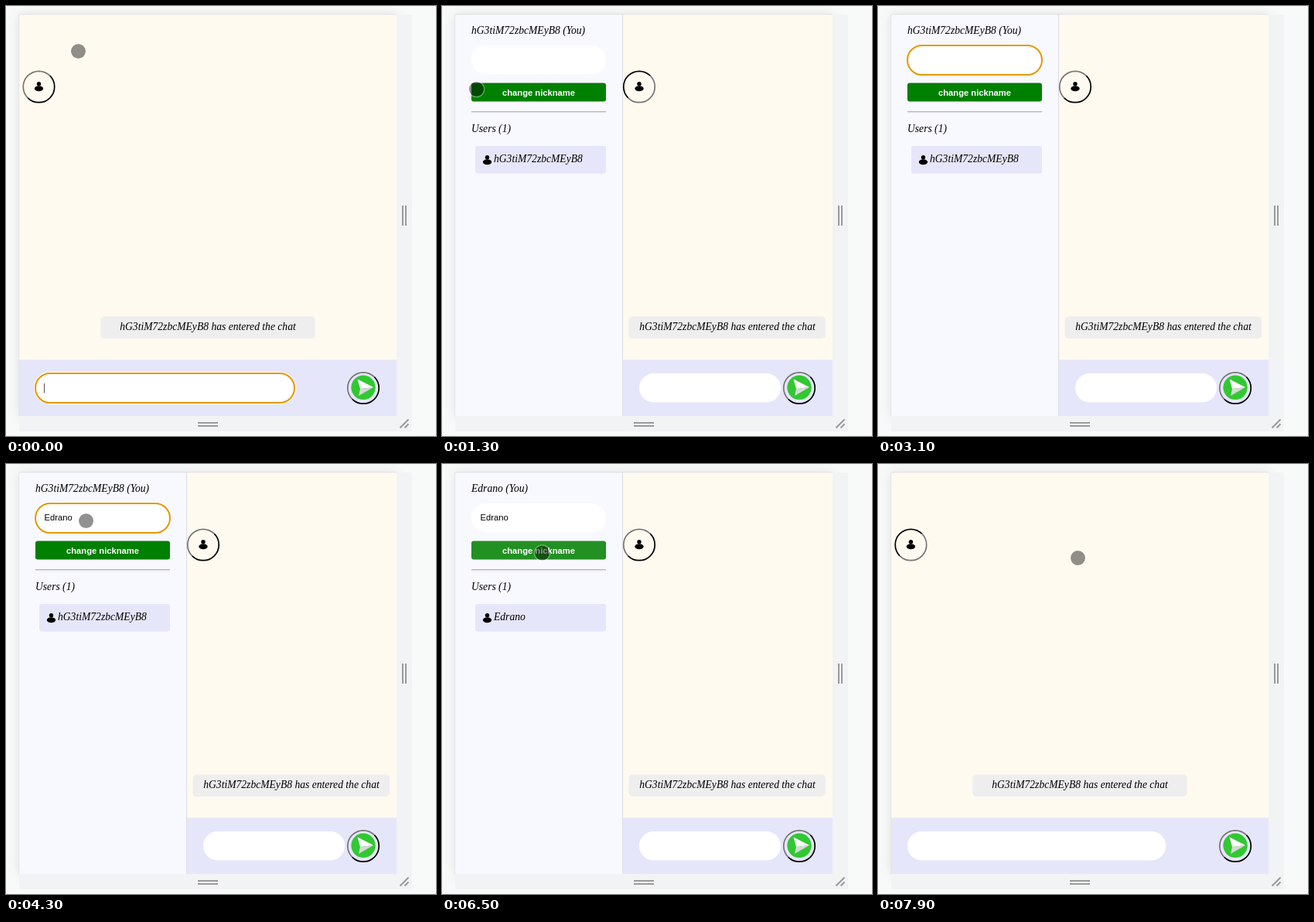
An HTML page that plays this animation: 556 px wide and 556 px high, repeating every 8000 ms.

```html
<!DOCTYPE html>
<html lang="en">
<head>
<meta charset="utf-8">
<title>Chat sidebar</title>
<style>
  html, body { margin: 0; width: 100%; height: 100%; overflow: hidden; background: #f8faf9; }
  svg { display: block; width: 556px; height: 556px; }
  .serif { font: italic 13.6px "Liberation Serif", "Times New Roman", serif; }
  .sans { font: 11.2px "Liberation Sans", Arial, sans-serif; }
  .bold { font-weight: bold; fill: #fff; }
  .mid { text-anchor: middle; }
  .ring { fill: none; stroke: #e59700; stroke-width: 2; }
  .halo { fill: none; stroke: #fff; stroke-width: 4; }
  .edge { fill: none; stroke-width: 1.7; }
  .caret { fill: #555; }
  .grip { stroke: #9a9a9a; stroke-width: 2; }
  #page { filter: drop-shadow(0 0 8px rgba(0, 0, 0, .1)); }
</style>
</head>
<body>
<svg viewBox="0 0 556 556">
  <defs>
    <g id="person">
      <circle cy="-3.8" r="2.7"/>
      <ellipse cy="2.3" rx="5.7" ry="3.5"/>
    </g>
    <path id="half" d="M-14.3 14.3A20.2 20.2 0 0 1 14.3-14.3"/>
  </defs>
  <rect width="556" height="556" fill="#f8faf9"/>
  <rect id="page" x="17" y="11" width="488" height="519" fill="#fffaf0"/>
  <path d="M505 11h20v539H17v-20h488z" fill="#f1f3f4"/>
  <path class="grip" d="M513 258v26M517 258v26M248 539h26M248 543h26M509.5 545.5l11-11M515.5 545.5l5-5"/>

  <rect id="foot" y="457.5" height="72.5" fill="#e6e6fa"/>
  <rect id="note" y="401.5" height="28.5" rx="5" fill="#eee"/>
  <text id="noteText" class="serif mid" y="419"></text>

  <rect id="field" y="475" height="37.5" rx="18.7" fill="#fff"/>
  <g id="focusMain">
    <rect class="halo" x="38" y="475" width="335" height="38" rx="19"/>
    <rect class="ring" x="38" y="475" width="335" height="38" rx="19"/>
  </g>
  <rect id="caretMain" class="caret" x="49" y="488" width="1" height="12.5"/>

  <g transform="translate(462 494)">
    <use class="edge" href="#half" stroke="#767676"/>
    <use class="edge" href="#half" stroke="#000" transform="rotate(180)"/>
    <circle cy="-.7" r="15.7" fill="#32c832"/>
    <path fill="#fff" d="M-7.5-11.5L13-1L-4 1Z"/>
    <path fill="#d8d8d8" d="M-4 1L13-1L-6 10Z"/>
  </g>

  <g id="side">
    <rect x="17" y="11" width="216" height="519" fill="#f8f8ff"/>
    <path d="M233.5 11v519" stroke="#dcdce0"/>
    <text id="me" class="serif" x="38" y="36"></text>
    <rect x="38" y="51" width="174" height="37.5" rx="18.7" fill="#fff"/>
    <g id="focusName">
      <rect class="halo" x="38" y="51" width="174" height="38" rx="19"/>
      <rect class="ring" x="38" y="51" width="174" height="38" rx="19"/>
    </g>
    <text id="typed" class="sans" x="49.6" y="73"></text>
    <rect id="caretName" class="caret" y="63" width="1" height="12.5"/>
    <rect id="change" x="38" y="99.5" width="174" height="24" rx="3"/>
    <text class="sans bold mid" x="125" y="116">change nickname</text>
    <path d="M38 136.8h174" stroke="#9a9a9a"/>
    <path d="M38 137.8h174" stroke="#e4e4ea"/>
    <text class="serif" x="38" y="163">Users (1)</text>
    <rect x="43" y="181" width="169" height="35.5" rx="3" fill="#e6e6fa"/>
    <use href="#person" x="58.5" y="199.5"/>
    <text id="user" class="serif" x="67" y="202"></text>
  </g>

  <path d="M17 10.8h488" stroke="#e0e0e0"/>
  <path d="M16.7 11v519" stroke="#e4e4e4"/>

  <g id="toggle">
    <use id="upper" class="edge" href="#half"/>
    <use id="lower" class="edge" href="#half" transform="rotate(180)"/>
    <use href="#person"/>
  </g>

  <g id="cursor">
    <circle r="9.5" fill-opacity=".43"/>
    <circle r="10.2" fill="none" stroke="#fff" stroke-opacity=".35" stroke-width="1.2"/>
  </g>
</svg>
<script>
const LOOP = 8000, STEP = 100;
const guest = 'hG3tiM72zbcMEyB8', nick = 'Edrano';

// Each move eases along a curve from the last stop, bent toward a point
const home = [93.5, 58.5];
const moves = [
  { from: 200, to: 800, bend: [69, 83], end: [44.5, 107.5] },
  { from: 1500, to: 2100, bend: [90, 90], end: [103.5, 70.5] },
  { from: 4200, to: 4800, bend: [102.6, 91], end: [134.5, 116.5] },
  { from: 6400, to: 7000, bend: [91, 94], end: [319.5, 418.5] },
  { from: 7000, to: 7400, bend: [227, 49], end: [258.5, 121.5] }
];

const el = {};
document.querySelectorAll('svg [id]').forEach(n => el[n.id] = n);
const set = (n, attrs) => { for (const k in attrs) n.setAttribute(k, attrs[k]); };
const show = (n, on) => n.setAttribute('visibility', on ? 'inherit' : 'hidden');
const within = (t, a, b) => t >= a && t < b;
const clamp = (v, lo, hi) => Math.min(hi, Math.max(lo, v));
const smooth = p => p * p * (3 - 2 * p);
const blink = (t, since) => (t - since) % 1000 < 500;

function pointer(t) {
  let pos = home;
  for (const { from, to, bend, end } of moves) {
    if (t < from) break;
    const k = smooth(clamp((t - from) / (to - from), 0, 1)), j = 1 - k;
    pos = pos.map((a, i) => j * j * a + 2 * j * k * bend[i] + k * k * end[i]);
  }
  return pos;
}

// Two bursts of three letters, with a short pause between
const letters = t => clamp((t - 3100) / 100, 0, 3) + clamp((t - 3500) / 100, 0, 3);

function draw(t) {
  const open = within(t, 1300, 7900);
  const pressed = within(t, 1300, 1400) || t >= 7900;
  const naming = within(t, 2500, 5300);
  const renamed = t >= 5300;
  const name = renamed ? nick : guest;

  show(el.side, open);
  set(el.foot, open ? { x: 234, width: 271 } : { x: 17, width: 488 });
  set(el.note, open ? { x: 241.5, width: 254.5 } : { x: 122.3, width: 277.4 });
  set(el.noteText, { x: open ? 369 : 261 });
  set(el.field, open ? { x: 255, width: 183 } : { x: 38, width: 334.3 });
  set(el.toggle, { transform: `translate(${open ? 255 : 42.5} 104.5)` });
  set(el.upper, { stroke: pressed ? '#000' : '#767676' });
  set(el.lower, { stroke: pressed ? '#767676' : '#000' });

  show(el.focusMain, t < 1300);
  show(el.caretMain, t < 1300 && blink(t, 0));

  el.noteText.textContent = guest + ' has entered the chat';
  el.me.textContent = name + ' (You)';
  el.user.textContent = name;
  el.typed.textContent = nick.slice(0, letters(t));
  set(el.change, { fill: renamed ? '#229022' : '#008000' });

  show(el.focusName, naming);
  show(el.caretName, naming && blink(t, t < 3200 ? 2600 : Math.min(t, 3800)));
  const len = el.typed.textContent ? el.typed.getComputedTextLength() : 0;
  set(el.caretName, { x: Math.round(49.2 + len) });

  set(el.cursor, { transform: `translate(${pointer(t)})` });
  show(el.cursor, !within(t, 2900, 3200));
}

const start = performance.now();
function tick() {
  const t = (performance.now() - start) % LOOP;
  draw(Math.floor(t / STEP) * STEP);
  requestAnimationFrame(tick);
}
tick();
</script>
</body>
</html>
```
